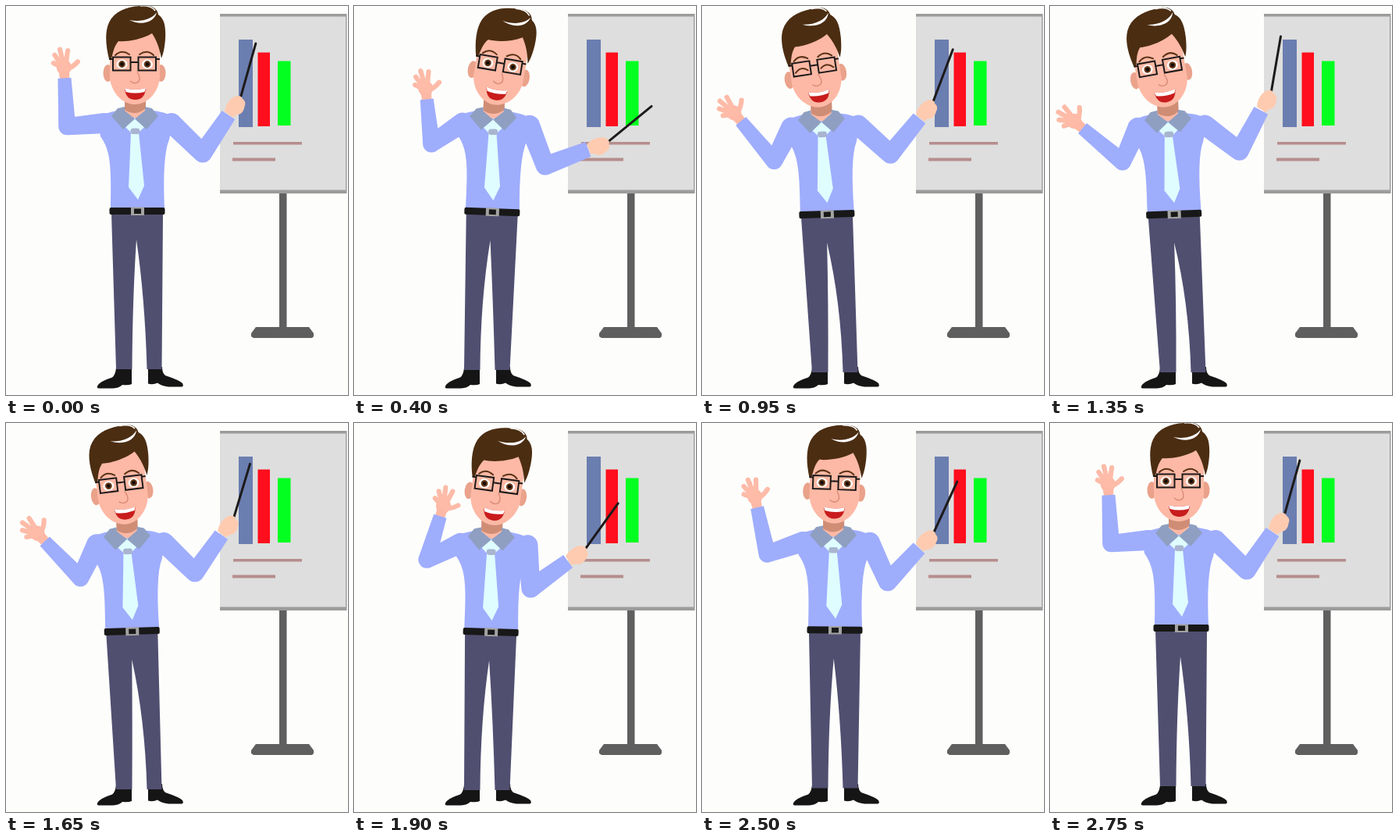
Animation of 438 by 498 pixels, one loop 2.8 s. Source, as an HTML page:

```html
<!DOCTYPE html>
<html lang="en">
<head>
<meta charset="utf-8">
<title>Presenter</title>
<style>
  html, body { margin: 0; width: 100%; height: 100%; overflow: hidden; background: #fdfefc; }
  svg { display: block; width: 438px; height: 498px; }
  .shirt { fill: #9fadfd; }
  .skin { fill: #fdb9a5; }
  .hand { fill: none; stroke: #fdbba8; stroke-width: 6.2; stroke-linecap: round; }
  .ink { fill: none; stroke: #1d1a1a; stroke-width: 2; }
  .brow { fill: none; stroke: #5b3217; stroke-width: 2; stroke-linecap: round; }
</style>
</head>
<body>
<svg viewBox="0 0 438 498">
  <rect width="438" height="498" fill="#fdfefc"/>

  <g id="board">
    <path fill="#5f5f5f" d="M350 238h9.500v173H388l6 8v4l-2 2H317l-3-2v-4l6-8h30z"/>
    <path fill="#dedede" d="M274 10h162v230H274z"/>
    <path fill="#9c9c9c" d="M274 10h162v3.500H274zM274 235.500h162v4.500H274zM435 10h1.500v230H435z"/>
    <path fill="#6b7eb0" d="M298 43h18v112h-18z"/>
    <path fill="#ff0e1d" d="M322.500 59.500H338V154h-15.500z"/>
    <path fill="#03ff20" d="M348 70.500h16.500V153H348z"/>
    <path fill="#b68e8d" d="M291 174h88v3.500h-88zM290 194.500h55v4h-55z"/>
  </g>

  <path fill="#151515" d="M141 462h20v22q-4 2-12 1-4 4-12 4.500h-18q-3 0-2-3 3-6 19-11 4-3 5-12z
    M182 462h18q0 8 4 11 18 6 22 10 2 4-1 4.500h-17q-9-1-14-5-6 3-12 1z"/>
  <path id="legs" fill="#514f70"/>

  <g id="palm">
    <ellipse class="skin" cy="-14" rx="9.500" ry="10"/>
    <path class="skin" d="M-6 3L-7-12H7L6 3z"/>
    <path class="hand" d="M-2-13L-13-20M-2-15L-11-30M0-15L-4-37M2-15L6-35M3-11Q11-13 18-20"/>
  </g>
  <path id="armL" class="shirt"/>
  <path id="armR" class="shirt"/>

  <g id="torso">
    <path class="shirt" d="M134 260C135 205 134 185 121 167L117 143Q126 137 142 134H188Q208 136 215 144L209 171Q200 192 203 260z"/>
    <path fill="#dffcff" d="M165 143L153 155 160 162 157 232 169 248 177 230 170 162 177 155z"/>
    <path class="skin" d="M152 108H179V136Q166 150 152 136z"/>
    <path fill="#cf8d76" d="M152 108H179V131Q166 142 152 133z"/>
    <path id="flap" fill="#8f9fc1" d="M152 129L143 131 135 141 150 158 165 144.500 152 134z"/>
    <use href="#flap" transform="translate(330) scale(-1 1)"/>
    <rect x="159.500" y="156.500" width="12" height="7.500" rx="3.500" fill="#a9b5d0"/>
    <rect x="132.500" y="258" width="71" height="9" rx="2" fill="#181818"/>
    <path fill="#a3a3a3" d="M160 257.500h17v10.500h-17z"/>
    <path fill="#181818" d="M164 259.500h9v6.500h-9z"/>
  </g>

  <g id="head">
    <ellipse id="ear" cx="130.500" cy="86" rx="6" ry="11" fill="#eaa28b"/>
    <use href="#ear" transform="translate(329) scale(-1 1)"/>
    <path class="skin" d="M133 55V92C135 112 150 126 165 126S195 112 197 92V50L186 28 144 36z"/>
    <path fill="#4b2d12" d="M132 68C128 52 126 34 132 21 139 7 153 1 172 0 184-2 194 2 195 11 202 16 205 24 204 42 203 56 201 62 199 67 197 56 194 46 187 35 172 44 152 46 144 45 138 52 137 60 135 68z"/>
    <path fill="#fff" d="M158 18C173 21 187 17 193 8 190 22 172 25 158 18z"/>
    <path fill="none" stroke="#fff" stroke-width="1.500" d="M172 0Q186-1 191 6"/>
    <g id="open">
      <g id="eye">
        <ellipse cx="148.500" cy="74.500" rx="7" ry="6" fill="#fff"/>
        <circle cx="148.500" cy="74.500" r="3.400" fill="#120b08" stroke="#6a3c1c" stroke-width="2"/>
      </g>
      <use href="#eye" x="32.500"/>
    </g>
    <g id="shut">
      <path id="lid" class="brow" d="M140 78Q148 70 156 77"/>
      <use href="#lid" transform="translate(329) scale(-1 1)"/>
    </g>
    <g id="lens">
      <path class="brow" d="M140 63Q148 55 158 62"/>
      <path class="ink" d="M137 65.500h22.500v17h-22.500zM159 72h6M132 68h5"/>
    </g>
    <use href="#lens" transform="translate(329) scale(-1 1)"/>
    <path fill="none" stroke="#dc8e7a" stroke-width="1.500" d="M168 84Q174 95 168 98 163 100 159 96"/>
    <path fill="#c91c1c" d="M152 105Q165 109 179 105 178 120 165.500 120T152 105z"/>
    <path fill="#fff" d="M152 105Q165 109 179 105L177.500 110Q165 113 153.500 110z"/>
  </g>

  <g id="fist">
    <path fill="none" stroke="#1d1a1a" stroke-width="3" stroke-linecap="round" d="M-1 8L0-73"/>
    <path fill="#fecbb0" d="M-16 21C-17 11-13 3-8-1-3-4 1-3 2 0 6 1 8 5 7 9 8 15 5 20 1 21L-4 26z"/>
  </g>
</svg>

<script>
const LOOP = 2800, STEP = 50;
const $ = id => document.getElementById(id);

// Time, lean, dip, then the angles of upper arm and forearm: left pair, right pair.
const keys = [
  [0, 0, 0, -95, -3, 134, 34],
  [400, 9.5, 1, -124, -6, 159, 69],
  [950, -8.7, 4, -153, -40, 132, 39],
  [1350, -10, 4, -156, -50, 127, 28],
  [1630, -8, 4, -156, -47, 132, 34],
  [1900, 7.7, 5, -116, 17, 176, 54],
  [2300, 5, 4, -124, 8, 172, 50],
  [2550, 1.5, 2, -105, -15, 151, 41]
];
keys.push([LOOP - STEP, ...keys[0].slice(1)]);

// Key number i on the endless time line.
function at(i) {
  const n = keys.length, [t, ...v] = keys[(i + n) % n];
  return { t: t + Math.floor(i / n) * LOOP, v };
}

// Smooth curve through the keys.
function pose(t) {
  const i = keys.findLastIndex(k => k[0] <= t);
  const [p, a, b, n] = [at(i - 1), at(i), at(i + 1), at(i + 2)];
  const d = b.t - a.t, u = (t - a.t) / d, w = 1 - u;
  return a.v.map((y, j) => {
    const m0 = (b.v[j] - p.v[j]) / (b.t - p.t) * d;
    const m1 = (n.v[j] - y) / (n.t - a.t) * d;
    return y * (1 + 2 * u) * w * w + m0 * u * w * w + b.v[j] * u * u * (3 - 2 * u) - m1 * u * u * w;
  });
}

// Point at offset (x, y) from (ox, oy), turned clockwise by deg.
function turn(ox, oy, deg, x, y) {
  const a = deg * Math.PI / 180, c = Math.cos(a), s = Math.sin(a);
  return [ox + x * c - y * s, oy + x * s + y * c];
}

const disc = ([x, y], r) => `M${x - r} ${y}a${r} ${r} 0 0 0 ${2 * r} 0a${r} ${r} 0 0 0 ${-2 * r} 0z`;

function taper(a, b, deg, ra, rb) {
  const side = (p, r) => turn(...p, deg, r, 0);
  return 'M' + [side(a, ra), side(b, rb), side(b, -rb), side(a, -ra)].join('L') + 'z';
}

// Draws a sleeve from shoulder s and returns the wrist.
function sleeve(id, s, [upper, fore], [len1, len2], [r1, r2, r3]) {
  const elbow = turn(...s, upper, 0, -len1), wrist = turn(...elbow, fore, 0, -len2);
  $(id).setAttribute('d',
    disc(s, r1) + taper(s, elbow, upper, r1, r2) + disc(elbow, r2) + taper(elbow, wrist, fore, r2, r3));
  return wrist;
}

function put(id, x, y, deg, px = 0, py = 0) {
  $(id).setAttribute('transform', `translate(${x} ${y}) rotate(${deg}) translate(${-px} ${-py})`);
}

function draw(t) {
  const [lean, dip, upL, foreL, upR, foreR] = pose(t);
  const body = [168 + 0.93 * lean, 263 + dip, 0.22 * lean];
  put('torso', ...body, 168, 263);
  put('head', 164.5 + 2.4 * lean, 74 + dip, lean, 164.5, 74);

  const hipL = turn(...body, -33, 3), hipR = turn(...body, 33, 3), fork = turn(...body, -1, 36);
  const hem = 202 + body[1], knee = hem - 90;
  $('legs').setAttribute('d',
    `M${hipL}L141 ${hem}H161.500Q162 ${knee} ${fork}Q178 ${knee} 180.500 ${hem}H199.500L${hipR}z`);

  const wristL = sleeve('armL', turn(...body, -42, -113), [upL, foreL], [48, 62 - lean / 2], [13, 11, 8.5]);
  put('palm', ...wristL, foreL);

  const wristR = sleeve('armR', turn(...body, 44, -113), [upR, foreR], [55.5, 59], [13, 12, 10]);
  const aim = foreR - 19;
  put('fist', ...turn(...wristR, aim, 10, -24.5), aim);

  const blink = t >= 850 && t < 1050;
  $('open').style.display = blink ? 'none' : '';
  $('shut').style.display = blink ? '' : 'none';
}

function tick() {
  draw(Math.floor(performance.now() % LOOP / STEP) * STEP);
  requestAnimationFrame(tick);
}
tick();
</script>
</body>
</html>
```
